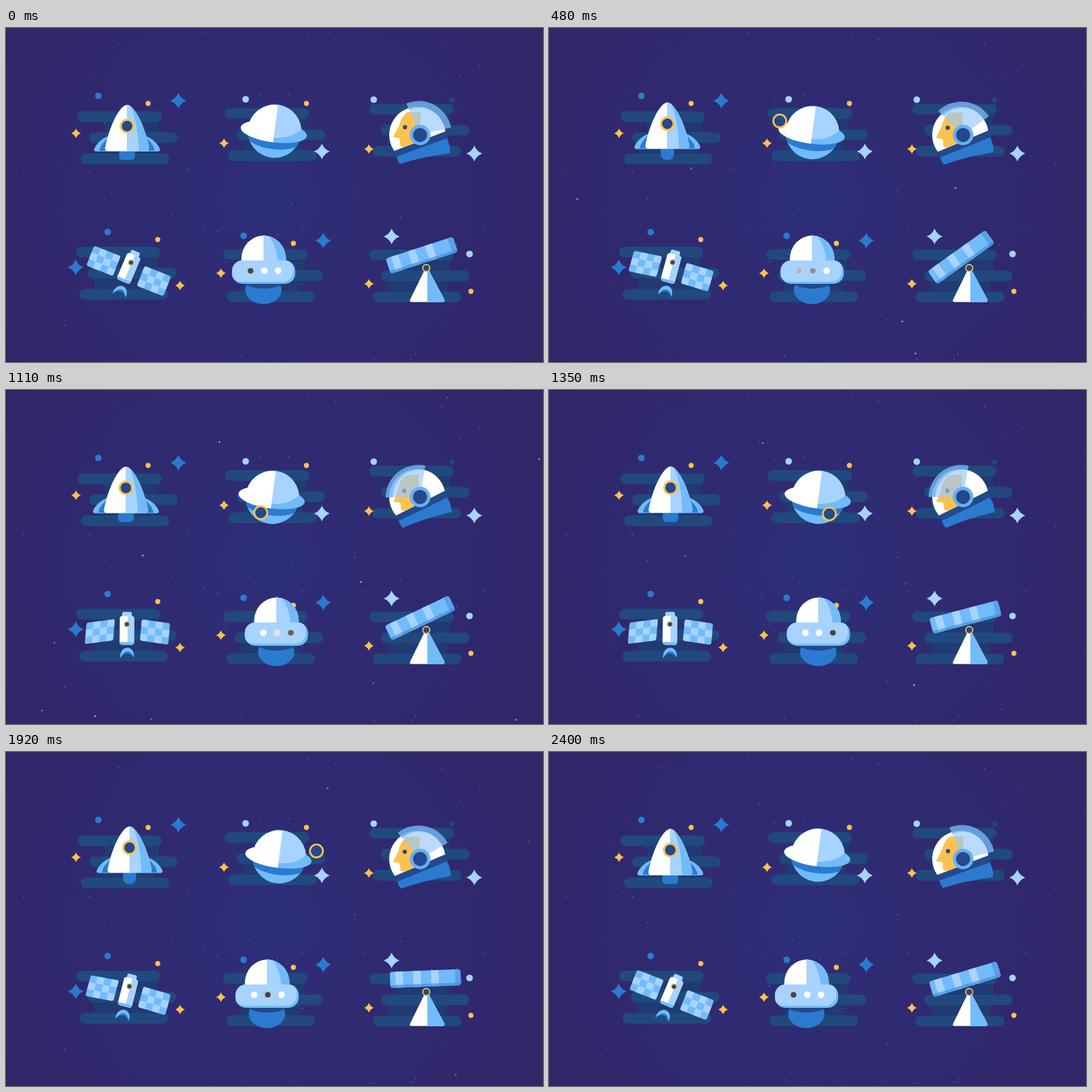
These frames come from a looping animation (782 px wide and 487 px high, 2430 ms). An HTML page with a canvas:

```html
<!DOCTYPE html>
<html lang="en">
<head>
<meta charset="utf-8">
<title>Space icons</title>
<style>
html, body { margin: 0; width: 100%; height: 100%; overflow: hidden; background: #2f2768; }
canvas { display: block; }
</style>
</head>
<body>
<canvas id="stage" width="782" height="487"></canvas>
<script>
const ctx = document.getElementById('stage').getContext('2d');
const LOOP = 2430, STEP = 30, RAD = Math.PI / 180, TAU = Math.PI * 2;
const WHITE = '#fff', PALE = '#a6d3ff', SKY = '#72bbfa', BLUE = '#2a7bcf',
      NAVY = '#24498c', GOLD = '#fdc14f', BAR = '#21497e', SHADE = '#213a72';

// ---------- helpers ----------
const clamp = v => Math.max(0, Math.min(1, v));
const smooth = v => v * v * (3 - 2 * v);

function fill(color, path) {
  ctx.fillStyle = color;
  ctx.fill(typeof path === 'string' ? new Path2D(path) : path, 'evenodd');
}
function ellipse(x, y, rx, ry = rx) {
  const p = new Path2D();
  p.ellipse(x, y, rx, ry, 0, 0, TAU);
  return p;
}
function box(x, y, w, h, r = 0) {
  const p = new Path2D();
  p.roundRect(x, y, w, h, r);
  return p;
}
function ringPath(x, y, outer, inner) {
  const p = ellipse(x, y, outer);
  p.addPath(ellipse(x, y, inner));
  return p;
}
const dot = (x, y, r, color) => fill(color, ellipse(x, y, r));
function sparkle(x, y, r, color) {
  const k = r * .28;
  fill(color, `M${x} ${y - r}Q${x + k} ${y - k} ${x + r} ${y}Q${x + k} ${y + k} ${x} ${y + r}` +
    `Q${x - k} ${y + k} ${x - r} ${y}Q${x - k} ${y - k} ${x} ${y - r}Z`);
}
function porthole(x, y, r, line) {
  fill(GOLD, ringPath(x, y, r, r - line - .3));
  dot(x, y, r - line, NAVY);
}
function at(x, y, degrees, draw) {
  ctx.save();
  ctx.translate(x, y);
  ctx.rotate(degrees * RAD);
  draw();
  ctx.restore();
}
function clipTo(path, draw) {
  ctx.save();
  ctx.clip(typeof path === 'string' ? new Path2D(path) : path);
  draw();
  ctx.restore();
}
function seeded(seed) {
  return () => (seed = seed * 16807 % 2147483647) / 2147483647;
}

// ---------- sky ----------
function sky(t) {
  const glow = ctx.createRadialGradient(383, 250, 0, 383, 250, 440);
  glow.addColorStop(0, '#2c2f7a');
  glow.addColorStop(.2, '#2f2c75');
  glow.addColorStop(.6, '#30296f');
  glow.addColorStop(1, '#312668');
  ctx.fillStyle = glow;
  ctx.fillRect(0, 0, 782, 487);

  const random = seeded(4177);
  for (let i = 0; i < 45; i++) dot(random() * 782, random() * 487, .9, 'rgba(160,150,215,.5)');
  for (let i = 0; i < 20; i++) {
    const x = random() * 782, y = random() * 487, dx = random() * 20 - 10, dy = random() * 14 - 4;
    const start = 150 + random() * 1300, s = clamp((t - start) / (600 + random() * 200));
    ctx.globalAlpha = .75 * Math.sin(Math.PI * s);
    dot(x + dx * s, y + dy * s, 1.4, '#c3bfe6');
  }
  ctx.globalAlpha = 1;
}

// Bars with two dots and two sparkles, all placed from the top bar's corner
function backdrop(x, y, tint, tintDot, goldDot, big, small, dotColor = GOLD) {
  ctx.save();
  ctx.translate(x, y);
  fill(SHADE, box(40, 14, 78, 18));
  fill(SHADE, box(27, 45, 86, 18));
  fill(BAR, box(0, 0, 123, 15.5, 7.7));
  fill(BAR, box(17, 30.7, 129, 15.5, 7.7));
  fill(BAR, box(5, 61.5, 129, 15.5, 7.7));
  dot(...tintDot, 4.8, tint);
  dot(...goldDot, 3.7, dotColor);
  sparkle(...big, 11.5, tint);
  sparkle(...small, 7, GOLD);
  ctx.restore();
}

// ---------- icons ----------
function rocket(a, sway) {
  backdrop(104, 121.5, BLUE, [30.5, -22.5], [103, -11.5], [147, -15.5], [-2, 32]);
  const lift = 1 - Math.cos(2 * a), x = 176 - 4 * sway, y = 143 - 1.9 * lift;
  const half = 11.5 - lift, round = 5 + 2 * lift;
  fill(BLUE, box(x - half, y + 32, half * 2, 160.5 - y, [0, 0, round, round]));
  at(x, y, 0, () => {
    for (const side of [1, -1]) {
      ctx.save();
      ctx.scale(side, 1);
      fill(SKY, 'M-28 15C-37 18-46 27-48 34Q-48 37-45 37H0V14Z');
      fill(BLUE, 'M-29 18C-34 24-39 28-40 36H0Z');
      ctx.restore();
    }
    const hull = 'M0-31C12-30 27 4 32 32Q32 36.5 28 36.5H-28Q-32 36.5-32 32C-27 4-12-30 0-31Z';
    fill(WHITE, hull);
    clipTo(hull, () => {
      fill(SKY, box(0, -40, 50, 90));
      fill(PALE, 'M0-40C12-20 17 10 17 40H0Z');
    });
    porthole(0, 0, 10.7, 3);
  });
}

function planet(a, sway) {
  backdrop(318.5, 117, PALE, [30.5, -13], [119, -7], [141.5, 63], [-1, 51]);
  const orbitX = -61 * sway;
  const orbitY = -28 * Math.sin(Math.cos(a) * Math.PI / 2) + .05 * orbitX;
  const moon = () => porthole(392 + orbitX, 152 + orbitY, 10.8, 2.8);
  const inFront = Math.cos(a) < .5;
  if (!inFront) moon();
  at(390.5 - 7.5 * sway, 150.3 + 3.1 * (1 - Math.cos(a)), 7.5, () => {
    const globe = ellipse(0, 0, 39);
    fill(SKY, globe);
    clipTo(globe, () => fill(BLUE, ellipse(0, 9, 42, 17.5)));
    const ring = ellipse(-1, 1, 48.5, 15.5);
    fill(SKY, ring);
    clipTo(ring, () => fill(WHITE, box(-60, -30, 60, 60)));
    const dome = 'M-39 0A39 39 0 0 1 38-8C30 2 15 9 0 9Q-25 9-39 0Z';
    fill(WHITE, dome);
    clipTo(dome, () => fill(PALE, box(0, -40, 50, 60)));
  });
  if (inFront) moon();
}

function helmet(a, u) {
  backdrop(529, 110.5, PALE, [6.5, -6], [120, -5.5], [153, 72.5], [-.5, 66], BAR);
  at(603, 156, 6 * u, () => {
    fill(NAVY, 'M-35 26L36-9L42 3L-31 37Z');
    fill(BLUE, 'M-31 35L39 1Q46 10 46 22Q10 30-25 45Q-29 41-31 35Z');
    const shell = 'M-35 27A41 41 0 1 1 36-9Z';
    fill(WHITE, shell);
    clipTo(shell, () => {
      fill(GOLD, 'M-22-31L-2-33V16L-11 18L-25 20Q-28 19-28 15L-29 8L-39 7L-32-10Q-30-24-22-31Z');
      dot(-23, -9, 3.1, NAVY);
    });
  });
  at(603, 156, -67 * smooth((1 - Math.cos(a + .1)) / 2), () => {
    const visor = 'M0 0L-20-46A48 48 0 0 1 45-11Z';
    fill('rgba(150,200,255,.66)', visor);
    clipTo(visor, () => fill('rgba(90,160,232,.5)', ringPath(0, 0, 55, 40)));
  });
  dot(603, 156, 15, '#69aff2');
  dot(603, 156, 10.3, NAVY);
}

function panel(x, y, xAngle, yAngle, phase) {
  const cell = 10.4;
  ctx.save();
  ctx.transform(Math.cos(xAngle * RAD), Math.sin(xAngle * RAD),
               -Math.sin(yAngle * RAD), Math.cos(yAngle * RAD), x, y);
  const face = box(-2 * cell, -1.5 * cell, 4 * cell, 3 * cell, 3);
  fill(SKY, face);
  clipTo(face, () => {
    for (let row = 0; row < 3; row++)
      for (let col = (row + phase) % 2; col < 4; col += 2)
        fill(PALE, box((col - 2) * cell, (row - 1.5) * cell, cell, cell));
  });
  ctx.restore();
}

function satellite(u) {
  backdrop(102, 319, BLUE, [46, -21.5], [119, -10.5], [-.5, 30], [151.5, 56.5]);
  const lean = 4.5 + 17 * u;
  at(176.5 - 10 * u, 385, 20 * u, () => {
    fill(BLUE, 'M-10 6C-11-14 11-14 10 6Q0-8-10 6Z');
    fill(SKY, 'M-10 6C-11-14 11-14 10 4Q0-13-10 6Z');
  });
  panel(136.5 + 5.5 * u, 352.5 - 13 * u, -8 + 29.5 * u, lean, 1);
  panel(217 - 1.5 * u, 352.5 + 16.5 * u, 8 + 13.5 * u, lean, 0);
  at(176 + 3 * u, 349.5, 23 * u, () => {
    fill(PALE, box(-7, -26, 14, 9, 2.5));
    const hull = box(-10.5, -20, 21, 42, 4);
    fill(WHITE, hull);
    clipTo(hull, () => {
      fill(PALE, box(1, -21, 12, 44));
      fill(SKY, box(-11, 18, 22, 5));
    });
    porthole(0, -8, 4.6, 1.5);
  });
}

function saucer(t, a) {
  backdrop(316, 322.5, BLUE, [30, -19.5], [102.5, -8.5], [146, -12.5], [-3, 35]);
  const fade = middle => clamp((t - middle) / 320 + .5);
  const active = fade(450) + fade(1000) - fade(1620) - fade(2130);
  at(375 + 9.4 * (1 - Math.cos(a + .2)), 354, 0, () => {
    const base = ellipse(-.3, 28, 26.5, 20.5);
    fill(BLUE, base);
    clipTo(base, () => fill(NAVY, ellipse(0, 14, 30, 12)));
    const dome = 'M-32.5-10V-17A32.5 34.5 0 0 1 32.5-17V-10Z';
    fill(WHITE, dome);
    clipTo(dome, () => {
      fill(SKY, box(0, -60, 40, 60));
      fill(PALE, 'M0-60Q20-40 21-10H0Z');
    });
    const body = box(-46, -15, 92, 34, 15);
    fill(SKY, body);
    clipTo(body, () => fill(PALE, box(-48, -18, 91, 34, 15)));
    for (let i = 0; i < 3; i++) {
      const x = -19 + 20 * i;
      dot(x, 0, 4.8, WHITE);
      ctx.globalAlpha = clamp(1 - Math.abs(active - i));
      porthole(x, 0, 5.5, 1.4);
      ctx.globalAlpha = 1;
    }
  });
}

function telescope(sway) {
  backdrop(529, 323, PALE, [146, 6.5], [148, 61], [32.5, -19], [-.5, 50]);
  const cone = 'M610 352Q612.5 347 615 352L638.5 396Q639 399.5 636 399.5H591Q587 399.5 588.5 396Z';
  fill(WHITE, cone);
  clipTo(cone, () => fill(SKY, box(613.5, 340, 40, 70)));
  at(612, 350, -19.5 - 17.5 * sway, () => {
    const tube = box(-52, -31.5, 103, 23.5, 4);
    fill(SKY, tube);
    clipTo(tube, () => {
      for (let x = -44; x < 20; x += 26) fill(PALE, box(x, -32, 11, 24));
      fill('#58a1ea', box(43, -32, 10, 24));
      fill('rgba(62,140,222,.65)', box(-53, -12, 106, 5));
    });
  });
  porthole(612, 350, 6, 1.7);
}

function draw(t) {
  const a = TAU * t / LOOP, sway = Math.sin(a - .08), u = (1 + Math.cos(a)) / 2;
  sky(t);
  rocket(a, sway);
  planet(a, sway);
  helmet(a, u);
  satellite(u);
  saucer(t, a);
  telescope(sway);
}

const begin = performance.now();
function tick() {
  const t = (performance.now() - begin) % LOOP;
  draw(Math.floor(t / STEP) * STEP);
  requestAnimationFrame(tick);
}
tick();
</script>
</body>
</html>
```
